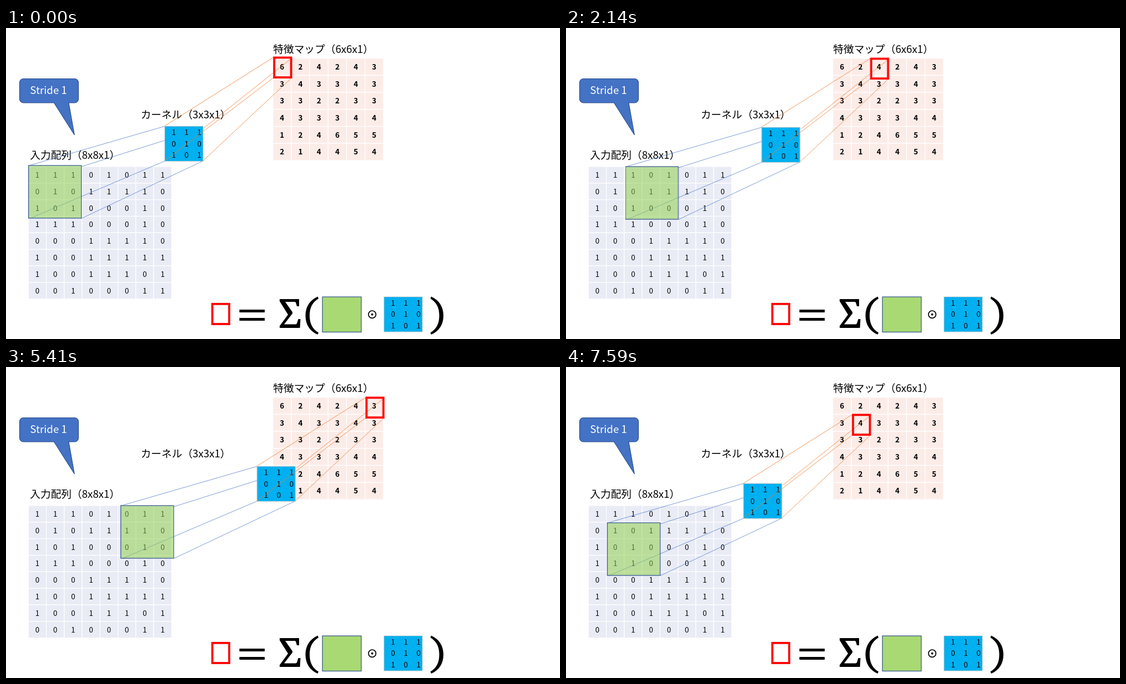
Recreate the animation shown at these times as an HTML page. Size 998 by 561 pixels, loop 8 s.

```html
<!DOCTYPE html>
<html lang="ja">
<head>
<meta charset="utf-8">
<title>Convolution, stride 1</title>
<style>
  html, body { margin: 0; width: 100%; height: 100%; overflow: hidden; background: #fff; }
  svg { display: block; width: 998px; height: 561px; }
  text { font-family: "Noto Sans CJK JP", "Noto Sans CJK", "Noto Sans", sans-serif; }
  .title { font-size: 18.7px; }
  .cell { font-size: 13.4px; text-anchor: middle; }
  .bold { font-weight: 700; }
  .edge { stroke: #2f528f; stroke-width: 1.2; }
  .red { fill: none; stroke: #f00; stroke-width: 3.8; }
  .in { stroke: #4472c4; stroke-width: .7; }
  .out { stroke: #ed7d31; stroke-width: .8; }
  #scan { animation: scan 8s step-end infinite; }
  @keyframes scan {
    0% { transform: translate(0, 0); }
    13.125% { transform: translate(33px, 2px); }
    26.75% { transform: translate(66.5px, 2px); }
    40.375% { transform: translate(96.5px, 2px); }
    54% { transform: translate(129px, 2px); }
    67.625% { transform: translate(166.2px, 2px); }
    81.25% { transform: translate(0, 33px); }
    94.875%, 100% { transform: translate(33.8px, 33px); }
  }
</style>
</head>
<body>
<svg viewBox="0 0 998 561">
  <defs>
    <g id="kernel"><rect width="69" height="63" fill="#00b0f0" stroke="#bfbfbf" stroke-width=".8"/></g>
    <path id="paren" d="M561.5 484.500C547 491 539.500 503 539.500 518.700S547 547 561.500 553L563 549.500C552 543 547 533 547 518.700S552 495 563 488Z"/>
  </defs>

  <g id="input"></g>
  <g id="map"></g>
  <text class="title" x="43.3" y="236">入力配列（8x8x1）</text>
  <text class="title" x="242.7" y="162.700">カーネル（3x3x1）</text>
  <text class="title" x="481.3" y="45.2">特徴マップ（6x6x1）</text>

  <path class="edge" fill="#4472c4" d="M31.5 91.5H123.5a7 7 0 0 1 7 7V128a7 7 0 0 1-7 7H113L123.3 193 86.5 135H31.5a7 7 0 0 1-7-7V98.5a7 7 0 0 1 7-7Z"/>
  <text class="title" x="43.3" y="119.3" fill="#fff">Stride 1</text>

  <g id="scan">
    <path class="in" fill="none" d="M43 247.700L286 177.200M136 250L355 181M43 343.500L286 240M136 343.500L355 239.700"/>
    <rect class="edge" x="40.6" y="248" width="95.2" height="95" fill="#92d050" fill-opacity=".55"/>
    <use href="#kernel" x="286" y="177.2"/>
    <path class="out" fill="none" d="M286 176.600L481.700 53M357 180L513.700 55M286 239.700L482 89.500M355 239.500L514 90.500"/>
    <rect class="red" x="483.2" y="53.4" width="30.5" height="35.7"/>
  </g>

  <rect class="red" x="371.7" y="497.800" width="30.400" height="36.200" stroke-width="3.4"/>
  <g id="formula">
    <path d="M420.500 508H466V513H420.500ZM420.500 523H466V528H420.500Z"/>
    <path d="M493 489H528V502H524L522 495Q521.500 494 520 494H503L516 512.500V515L501 534.500H521Q523 534.500 524 533L526.500 525H530.500L529.500 541H493V537.500L508 517 493 493Z"/>
    <use href="#paren"/>
    <use href="#paren" transform="translate(1327.500) scale(-1 1)"/>
    <circle cx="659.7" cy="516.7" r="6.7" fill="none" stroke="#000" stroke-width="1.7"/>
    <circle cx="659.7" cy="516.7" r="1.9"/>
  </g>
  <rect class="edge" x="570" y="485" width="70" height="63.5" fill="#a8d973"/>
  <use href="#kernel" x="681" y="485"/>
</svg>
<script>
  const NS = "http://www.w3.org/2000/svg";

  function add(parent, tag, attrs, content = "") {
    const node = document.createElementNS(NS, tag);
    for (const key in attrs) node.setAttribute(key, attrs[key]);
    node.textContent = content;
    parent.append(node);
  }

  function grid(id, rows, { x, y, w, h, textX = w / 2, textY = h / 2, fill, cls = "" }) {
    const parent = document.getElementById(id);
    rows.split(" ").forEach((row, r) => [...row].forEach((digit, c) => {
      const left = x + c * w, top = y + r * h;
      if (fill) add(parent, "rect", { x: left, y: top, width: w, height: h, fill, stroke: "#fff", "stroke-width": 1.2 });
      add(parent, "text", { class: "cell " + cls, x: left + textX, y: top + textY + 4.9 }, digit);
    }));
  }

  grid("input", "11101011 01011110 10100010 11100010 00011110 10011111 10011101 00100011",
    { x: 40.4, y: 250, w: 32.25, h: 29.85, fill: "#e9ebf5" });
  grid("map", "624243 343343 332233 433344 124655 214454",
    { x: 480.7, y: 54.7, w: 33.2, h: 30.7, fill: "#fcece8", cls: "bold" });
  grid("kernel", "111 010 101",
    { x: 0, y: 0, w: 23, h: 20.9, textX: 16.2, textY: 10.6 });
</script>
</body>
</html>
```
